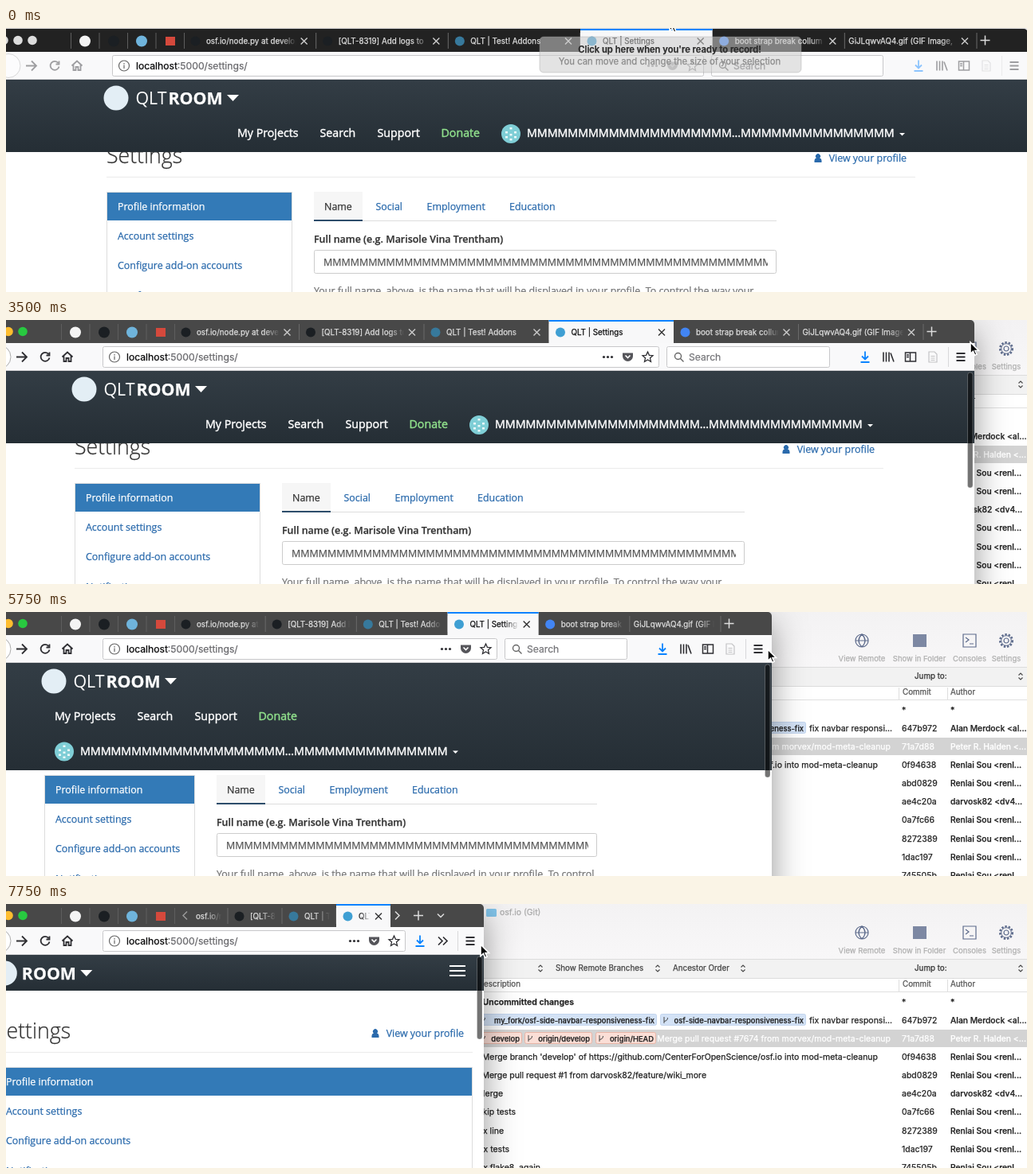
An HTML page with a canvas for the animation above (8000 ms loop, 1280 px wide and 332 px high).

```html
<!DOCTYPE html>
<html lang="en">
<head>
<meta charset="utf-8">
<title>Resizing a settings page</title>
<style>
  html, body { margin: 0; width: 100%; height: 100%; overflow: hidden; background: #fff; }
  canvas { display: block; }
</style>
</head>
<body>
<canvas id="stage" width="1280" height="332"></canvas>
<script>
const ctx = document.getElementById('stage').getContext('2d');
const LOOP = 8000, STEP = 250;
const ZOOM = 0.8895, PAGE_LEFT = -27, PAD = 15 * ZOOM;

// Keyframes as [time, value]
const EDGE = [[2500, 1269], [3500, 1214], [3750, 1200], [4750, 1109], [5000, 1078],
  [5750, 960], [6500, 791], [7500, 642], [7750, 599]];
const DRAG = [[1250, 1], [1500, 0.75], [1750, 0.3], [2000, 0]];
const CURSOR_X = [[0, -449], [500, -340], [1000, -18], [2250, -18], [2500, -5],
  [5750, -5], [6500, -11], [7000, -4]];
const CURSOR_Y = [[0, -11], [500, 122], [1000, 17], [2250, 16], [3500, 28], [4750, 41],
  [5750, 47], [6500, 53], [7750, 51]];

function at(keys, t) {
  if (t <= keys[0][0]) return keys[0][1];
  for (let i = 1; i < keys.length; i++) {
    const [t0, a] = keys[i - 1], [t1, b] = keys[i];
    if (t <= t1) return a + (b - a) * (t - t0) / (t1 - t0);
  }
  return keys[keys.length - 1][1];
}

const ui = (size, weight = 400) => `${weight} ${size}px Inter, sans-serif`;
const sans = (size, weight = 400) => `${weight} ${size}px "Open Sans", sans-serif`;
const BODY = sans(14 * ZOOM), NAV = sans(16 * ZOOM);
const TAB = ui(9.8), ROW = ui(10.5), ADDRESS = ui(12.15);
const LINK = '#2a6aac';

// A hairline stroke gives the slightly heavy look of smoothed screen type.
function text(s, x, y, font, color, align = 'left', heft = 0.25) {
  ctx.font = font;
  ctx.fillStyle = ctx.strokeStyle = color;
  ctx.lineWidth = heft;
  ctx.lineJoin = 'round';
  ctx.textAlign = align;
  ctx.fillText(s, x, y);
  ctx.strokeText(s, x, y);
}
function rect(x, y, w, h, color) {
  ctx.fillStyle = color;
  ctx.fillRect(x, y, w, h);
}
function box(x, y, w, h, r, fill, border) {
  ctx.beginPath();
  ctx.roundRect(x, y, w, h, r);
  if (fill) { ctx.fillStyle = fill; ctx.fill(); }
  if (border) { ctx.strokeStyle = border; ctx.lineWidth = 1; ctx.stroke(); }
}
function disc(x, y, r, color) {
  ctx.beginPath();
  ctx.arc(x, y, r, 0, 7);
  ctx.fillStyle = color;
  ctx.fill();
}
function icon(d, x, y, stroke, width = 1.5, fill) {
  const path = new Path2D(d);
  ctx.save();
  ctx.translate(x, y);
  ctx.lineJoin = 'miter';
  if (fill) { ctx.fillStyle = fill; ctx.fill(path); }
  if (stroke) { ctx.strokeStyle = stroke; ctx.lineWidth = width; ctx.stroke(path); }
  ctx.restore();
}
function clipped(x, y, w, h, draw) {
  ctx.save();
  ctx.beginPath();
  ctx.rect(x, y, w, h);
  ctx.clip();
  draw();
  ctx.restore();
}
function wrap(s, width, font) {
  ctx.font = font;
  const lines = [''];
  for (const word of s.split(' ')) {
    const last = lines[lines.length - 1], joined = last ? last + ' ' + word : word;
    if (last && ctx.measureText(joined).width > width) lines.push(word);
    else lines[lines.length - 1] = joined;
  }
  return lines;
}

const ICON = {
  forward: 'M-7 0H6M0 -6L6 0L0 6',
  reload: 'M4.5 -3.5A5.5 5.5 0 1 0 5.5 1M5.5 -6V-2H1.5',
  home: 'M-6.5 0L0 -6L6.5 0M-4.5 -1V5.5H-1.5V1.5H1.5V5.5H4.5V-1',
  close: 'M-4 -4L4 4M4 -4L-4 4',
  plus: 'M-6 0H6M0 -6V6',
  shield: 'M-6.5 -5H6.5V-1A6.5 6.5 0 0 1 -6.5 -1Z',
  star: 'M0 -6.5L1.9 -2.2L6.5 -1.8L3 1.3L4 6L0 3.5L-4 6L-3 1.3L-6.5 -1.8L-1.9 -2.2Z',
  lens: 'M3.5 -1A4 4 0 1 1 -4.5 -1A4 4 0 1 1 3.5 -1M2.5 2L6.5 6',
  download: 'M0 -7V3M-4 -1L0 3L4 -1M-5.5 6.5H5.5',
  library: 'M-6 -6V6M-2.5 -6V6M1 -6V6M3 -5L7 6',
  sidebar: 'M-6.5 -5.5H6.5V5.5H-6.5ZM-0.5 -5.5V5.5M-5 -2.5H-2M-5 0H-2',
  page: 'M-5 -6.5H2L5 -3.5V6.5H-5ZM-2.5 -1H2.5M-2.5 1.5H2.5M-2.5 4H2.5',
  menu: 'M-5.5 -4.5H5.5M-5.5 0H5.5M-5.5 4.5H5.5',
  more: 'M-5 -5L0 0L-5 5M1 -5L6 0L1 5',
  left: 'M3 -5L-2 0L3 5', right: 'M-2 -5L3 0L-2 5', down: 'M-4 -2L0 2L4 -2',
  updown: 'M-2.5 -1.5L0 -4L2.5 -1.5M-2.5 1.5L0 4L2.5 1.5',
  globe: 'M8 0A8 8 0 1 1 -8 0A8 8 0 1 1 8 0M-8 0H8M0 -8Q-8 0 0 8M0 -8Q8 0 0 8',
  shell: 'M-8 -8H8V8H-8ZM-5 -4L-1 -1L-5 2M0 4H5',
  gear: 'M3 0A3 3 0 1 1 -3 0A3 3 0 1 1 3 0',
  branch: 'M-2 -4V4M2.5 -3Q2.5 1 -2 1.5',
  person: 'M-4.5 5Q-5 0 -2 -0.5A3 3 0 1 1 2 -0.5Q5 0 4.5 5Z',
  arrow: 'M0 0V14.5L3.4 11.4L5.6 16.4L8 15.3L5.9 10.5H10.5Z',
};

// Repository window behind the browser
const RENLAI = 'Renlai Sou <renl...';
const COMMITS = [
  ['Uncommitted changes', 712, '*', '*'],
  ['fix navbar responsi...', 1111, '647b972', 'Alan Merdock <al...'],
  ['Merge pull request #7674 from morvex/mod-meta-cleanup', 1109, '71a7d88', 'Peter R. Halden <...'],
  ["Merge branch 'develop' of https://github.com/CenterForOpenScience/osf.io into mod-meta-cleanup", 1093, '0f94638', RENLAI],
  ['Merge pull request #1 from darvosk82/feature/wiki_more', 878, 'abd0829', RENLAI],
  ['Merge', 623, 'ae4c20a', 'darvosk82 <dv4...'],
  ['Skip tests', 639, '0a7fc66', RENLAI],
  ['fix line', 624, '8272389', RENLAI],
  ['fix tests', 631, '1dac197', RENLAI],
  ['fix flake8, again', 670, '745505b', RENLAI],
];
const TAGS = [
  ['my_fork/osf-side-navbar-responsiveness-fix', 591, 816, 146, '#d3e2f6', '#c3d5ee'],
  ['osf-side-navbar-responsiveness-fix', 820, 1003, 146, '#d3e2f6', '#c3d5ee'],
  ['develop', 591, 647, 169, '#fbded6', '#e8b5a6'],
  ['origin/develop', 650, 735, 169, '#fbded6', '#e8b5a6'],
  ['origin/HEAD', 739, 815, 169, '#fbded6', '#e8b5a6'],
];

function drawRepository() {
  const bar = ctx.createLinearGradient(0, 0, 0, 70);
  bar.addColorStop(0, '#f3f2f3');
  bar.addColorStop(1, '#f8f7f8');
  rect(0, 0, 1280, 332, '#fff');
  rect(0, 0, 1280, 70, bar);
  box(602, 6, 13, 10, 1.5, '#82c4ea');
  text('osf.io (Git)', 619, 14, ui(10.5), '#aaa');

  const blue = '#5d6b8c';
  icon(ICON.globe, 1073, 36, blue, 1.2);
  rect(1137, 28, 17, 16, '#7d88a3');
  icon(ICON.shell, 1208, 36, blue, 1.2);
  icon(ICON.gear, 1254, 36, blue, 1.2);
  ctx.setLineDash([2.4, 1.9]);
  icon('M7.7 0A7.7 7.7 0 1 1 -7.7 0A7.7 7.7 0 1 1 7.7 0', 1254, 36, blue, 2.6);
  ctx.setLineDash([]);
  icon('M6.3 0A6.3 6.3 0 1 1 -6.3 0A6.3 6.3 0 1 1 6.3 0', 1254, 36, blue, 1);
  [['View Remote', 1073], ['Show in Folder', 1145], ['Consoles', 1208], ['Settings', 1254]]
    .forEach(([s, x]) => text(s, x, 62, ui(9.5), '#b0b0b0', 'center'));

  rect(0, 69, 1280, 1, '#dcdcdc');
  rect(0, 70, 1280, 23, '#f2f2f2');
  rect(0, 93, 1280, 1, '#dcdcdc');
  text('Show Remote Branches', 689, 84, TAB, '#444');
  text('Ancestor Order', 836, 84, TAB, '#444');
  text('Jump to:', 1139, 84, TAB, '#333');
  for (const x of [670, 817, 924, 1272]) icon(ICON.updown, x, 81, '#444', 1.1);

  text('Description', 645, 104, TAB, '#555', 'right');
  text('Commit', 1124, 104, TAB, '#555');
  text('Author', 1184, 104, TAB, '#555');
  rect(1119, 95, 1, 15, '#ddd');
  rect(1180, 95, 1, 15, '#ddd');
  rect(0, 110, 1280, 1, '#e0e0e0');

  rect(0, 158, 1280, 22, '#d3d3d3');
  COMMITS.forEach(([message, right, hash, author], i) => {
    const y = 126.5 + i * 23.15, color = i === 2 ? '#fff' : '#222';
    text(message, right, y, i ? ROW : ui(10.5, 600), color, 'right');
    text(hash, 1123, y, ROW, color);
    text(author, 1184, y, ui(10.3, 500), color);
  });
  for (const [name, left, right, y, fill, border] of TAGS) {
    box(left + 0.5, y - 7.5, right - left - 1, 14, 2, fill, border);
    icon(ICON.branch, left + 7, y, '#444', 1);
    text(name, right - 3, y + 3.5, ui(9.4, 500), '#222', 'right');
  }
}

// Browser chrome
const TABS = [
  ['osf.io/node.py at develop', '#1b1f23'],
  ['[QLT-8319] Add logs to', '#1b1f23'],
  ['QLT | Test! Addons', '#37799c'],
  ['QLT | Settings', '#3f9fd3'],
  ['boot strap break collum', '#4285f4'],
  ['GiJLqwvAQ4.gif (GIF Image,', null],
];
const TABS_LEFT = 211, MIN_TAB = 68, ACTIVE = 3;

function drawTab(i, x, w) {
  const [title, color] = TABS[i], active = i === ACTIVE;
  const closable = active || w > 120;
  if (active) {
    rect(x, 0, w, 29, '#f8f8f9');
    rect(x, 0, w, 2, '#0a84ff');
  } else {
    rect(x + w - 0.5, 5, 1, 20, '#6a6a6a');
  }
  if (color) disc(x + 14.5, 15.5, 6, color);
  const start = x + (color ? 28 : 5), end = x + w - (closable ? 25 : 8);
  if (end > start) {
    const rgb = active ? '12,12,13' : '222,222,222';
    const fade = ctx.createLinearGradient(Math.max(start, end - 20), 0, end, 0);
    fade.addColorStop(0, `rgba(${rgb},1)`);
    fade.addColorStop(1, `rgba(${rgb},0)`);
    text(title, start, 19, TAB, fade);
  }
  if (closable) icon(ICON.close, x + w - 15, 15.5, active ? '#333' : '#ccc', 1.4);
}

function drawTabStrip(edge, active) {
  rect(-40, 0, edge + 40, 29, active ? '#484848' : '#222');
  const lights = active ? ['#ff5f57', '#ffbd2e', '#28c940'] : ['#ddd', '#ddd', '#ddd'];
  lights.forEach((color, i) => disc(-15 + 18 * i, 14.5, 5.8, color));
  for (let i = 0; i < 5; i++) rect(69 + 35.5 * i, 5, 1, 20, '#5e5e5e');
  disc(87, 15.5, 7, '#f4f4f4');
  disc(123, 15.5, 7, '#1b1f23');
  disc(158, 15.5, 7, '#6fb4dc');
  rect(188, 10, 12, 11, '#d5493c');

  const fit = (edge - 275) / TABS.length;
  if (fit >= MIN_TAB) {
    TABS.forEach((_, i) => drawTab(i, TABS_LEFT + fit * i, fit));
    icon(ICON.plus, edge - 53.5, 14.5, '#ddd');
    return;
  }
  const left = 236, right = edge - 117;
  const scroll = Math.max(0, left + MIN_TAB * (ACTIVE + 1) - right);
  clipped(left - 2, 0, right - left + 2, 29, () =>
    TABS.forEach((_, i) => drawTab(i, left + MIN_TAB * i - scroll, MIN_TAB)));
  icon(ICON.left, 224, 14.5, '#999');
  icon(ICON.right, edge - 109, 14.5, '#ddd');
  icon(ICON.plus, edge - 82, 14.5, '#ddd');
  icon(ICON.down, edge - 54, 14.5, '#ddd');
}

function drawToolbar(edge, active) {
  const compact = edge < 720, y = 46.5, room = edge - 302;
  const urlRight = Math.round(compact ? edge - 99 : 121 + 0.8 * room - 32.6);
  rect(-40, 29, edge + 40, 35, '#f9f9fa');
  rect(-40, 63, edge + 40, 1, '#d4d4d6');
  box(121.5, 33.5, urlRight - 121, 26, 2, '#fff', '#c8c8ca');
  if (!compact) box(urlRight + 10.5, 33.5, Math.round(edge) - 192 - urlRight, 26, 2, '#fff', '#c8c8ca');

  const ink = '#2f2f33';
  ctx.save();
  if (!active) ctx.globalAlpha = 0.45;
  disc(-9, y, 15, '#fff');
  icon('M15 0A15 15 0 1 1 -15 0A15 15 0 1 1 15 0', -9, y, '#aaa', 1);
  icon(ICON.forward, 20, y, ink, 1.8);
  icon(ICON.reload, 49, y, ink, 1.8);
  icon(ICON.home, 77, y, ink, 1.8);
  for (const dx of [-5, 0, 5]) disc(urlRight - 63.5 + dx, y, 1.6, ink);
  icon(ICON.shield, urlRight - 38.5, y, null, 0, '#55555a');
  icon('M-3 -2L0 1L3 -2', urlRight - 38.5, y, '#fff', 1.6);
  icon(ICON.star, urlRight - 13.5, y, ink, 1.3);
  icon(ICON.download, edge - (compact ? 80 : 137), y, '#0a84ff', 1.8);
  if (compact) {
    icon(ICON.more, edge - 52, y, ink, 1.7);
  } else {
    icon(ICON.library, edge - 108, y, ink, 1.6);
    icon(ICON.sidebar, edge - 80, y, ink, 1.5);
    icon(ICON.page, edge - 52, y, '#c4c4c6', 1.2);
  }
  rect(edge - 33, 34, 1, 25, '#d8d8da');
  icon(ICON.menu, edge - 17, y, ink, 1.8);
  ctx.restore();

  icon('M6.5 0A6.5 6.5 0 1 1 -6.5 0A6.5 6.5 0 1 1 6.5 0M0 -1V3.5M0 -3.5V-2', 136, y, '#666', 1.2);
  text('localhost', 151, 51, ADDRESS, '#0c0c0d');
  const host = ctx.measureText('localhost').width;
  text(':5000/settings/', 151 + host, 51, ADDRESS, '#6a6a6e');
  if (!compact) {
    icon(ICON.lens, urlRight + 25, y, '#666', 1.4);
    text('Search', urlRight + 38, 51, ADDRESS, '#77777b');
  }
}

// Web page with its responsive grid
function gridFor(edge) {
  const px = (edge - PAGE_LEFT) / ZOOM;
  const size = px >= 1200 ? 'lg' : px >= 992 ? 'md' : px >= 768 ? 'sm' : 'xs';
  const container = { lg: 1170, md: 970, sm: 750, xs: px }[size] * ZOOM;
  const left = Math.round((edge + PAGE_LEFT - container) / 2 + PAD);
  const right = Math.round(left + container - 2 * PAD);
  return { size, left, right, col: container / 12 };
}

function drawSidebar(x, w) {
  rect(x, 205, w, 130, '#ddd');
  rect(x + 1, 206, w - 2, 130, '#fff');
  rect(x + 1, 206, w - 2, 35, '#337ab7');
  let y = 227.5;
  ['Profile information', 'Account settings', 'Configure add-on accounts', 'Notifications'].forEach((item, i) => {
    const lines = wrap(item, w - 26, BODY);
    lines.forEach((line, n) => text(line, x + 14, y + 18 * n, BODY, i ? LINK : '#fff'));
    y += 37.4 + 18 * (lines.length - 1);
  });
}

function drawForm(x, w) {
  rect(x, 241, w, 1, '#ddd');
  rect(x, 205, 61, 36, '#f6f6f6');
  rect(x, 240, 61, 2, '#2d4d6b');
  text('Name', x + 13, 227.5, BODY, '#333');
  [['Social', 77.5], ['Employment', 141.5], ['Education', 245]]
    .forEach(([s, dx]) => text(s, x + dx, 227.5, BODY, LINK));
  text('Full name (e.g. Marisole Vina Trentham)', x, 268.5, sans(14 * ZOOM, 600), '#333');
  box(x + 0.5, 278.5, w - 1, 29, 2, '#fff', '#ccc');
  clipped(x + 11, 280, w - 22, 26, () => text('M'.repeat(70), x + 12, 297.5, BODY, '#555'));
  const hint = 'Your full name, above, is the name that will be displayed in your profile. To control the way your name';
  text(wrap(hint, w, BODY)[0], x, 334, BODY, '#777');
}

function drawAvatar(x, y) {
  disc(x, y, 12, '#7fced6');
  for (const [dx, dy] of [[-7, -3], [4, -3], [-7, 3], [4, 3], [-1.5, -8], [-1.5, 6], [-1.5, 0]])
    rect(x + dx, y + dy, 3, 2.5, '#eefafa');
}

function caret(x, y, w, h) {
  icon(`M0 0H${w}L${w / 2} ${h}Z`, x, y, null, 0, '#fff');
}

function drawNavbar(edge, grid) {
  const { size, left } = grid, collapsed = size === 'sm' || size === 'xs';
  const bottom = { lg: 155, md: 199 }[size] || 109;
  const shade = ctx.createLinearGradient(0, 64, 0, bottom);
  shade.addColorStop(0, '#333d45');
  shade.addColorStop(1, '#252e35');
  rect(-40, 64, edge + 40, bottom - 64, shade);

  const brand = collapsed ? PAGE_LEFT + PAD : left, full = size !== 'xs';
  disc(brand + 12, 87, 15.5, '#e3eef5');
  if (full) text('QLT', brand + 36.5, 95, sans(24 * ZOOM), '#fff', 'left', 0.01);
  text('ROOM', brand + (full ? 77.5 : 33.5), 95, sans(24 * ZOOM, 700), '#fff');
  caret(brand + (full ? 151 : 107), 83, 15, 8);

  if (collapsed) {
    const x = edge - (full ? 56 : 43);
    for (const y of [77, 83, 89]) rect(x, y, 20, 2, '#fff');
    return;
  }
  const x = left + (size === 'lg' ? 164 : 13);
  [['My Projects', 0], ['Search', 103.5], ['Support', 175.5], ['Donate', 255.5]]
    .forEach(([s, dx]) => text(s, x + dx, 136, NAV, s === 'Donate' ? '#90e08c' : '#fff', 'left', 0.45));
  const [ax, ay] = size === 'lg' ? [left + 507, 132] : [left + 25, 175.5];
  drawAvatar(ax, ay);
  text('M'.repeat(20) + '...' + 'M'.repeat(15), ax + 20, ay + 4, NAV, '#fff', 'left', 0.45);
  caret(ax + 487, ay - 1, 7, 3.5);
}

function drawPage(edge) {
  const grid = gridFor(edge), { size, left, right, col } = grid;
  rect(-40, 64, edge + 40, 270, '#fff');
  text('Settings', left, 169, sans(30 * ZOOM, 300), '#333');
  text('View your profile', right - 11, 166.5, BODY, LINK, 'right');
  icon(ICON.person, right - 122, 163, null, 0, LINK);
  rect(left, 186, right - left, 1, '#ebebeb');
  if (size === 'xs') {
    drawSidebar(left, right - left);
  } else {
    drawSidebar(left, Math.round(3 * col - 2 * PAD));
    drawForm(Math.round(left + 3 * col), Math.round((size === 'sm' ? 9 : 7) * col - 2 * PAD));
  }
  drawNavbar(edge, grid);
  if (edge < 1269) {
    const end = size === 'xs' ? 170 : size === 'lg' ? 211 : 208;
    box(edge - 8.5, 66, 6.5, end - 66, 3.2, 'rgba(0,0,0,.55)', 'rgba(255,255,255,.25)');
  }
}

function drawBrowser(edge, active) {
  ctx.save();
  ctx.shadowColor = 'rgba(0,0,0,.42)';
  ctx.shadowBlur = 42;
  ctx.shadowOffsetY = 14;
  box(-40, 0, edge + 40, 500, 5, '#fff');
  ctx.restore();
  ctx.save();
  ctx.beginPath();
  ctx.roundRect(-40, 0, edge + 40, 500, 5);
  ctx.clip();
  drawPage(edge);
  drawTabStrip(edge, active);
  drawToolbar(edge, active);
  ctx.restore();
}

function drawNotice() {
  box(669, 11, 328, 45, 5, 'rgba(205,205,205,.55)', 'rgba(150,150,150,.35)');
  text("Click up here when you're ready to record!", 832, 30.5, ui(11.2, 600), '#2a2a2a', 'center');
  text('You can move and change the size of your selection', 832, 45.5, ui(11.3), '#8b8b8b', 'center');
}

function draw(now) {
  const t = Math.floor(now % LOOP / STEP) * STEP;
  const edge = at(EDGE, t), drag = at(DRAG, t);
  drawRepository();
  ctx.save();
  ctx.translate(Math.round(12 * drag), Math.round(drag));
  drawBrowser(edge, t >= 1000);
  ctx.restore();
  if (t < STEP) drawNotice();
  icon(ICON.arrow, edge + 12 * drag + at(CURSOR_X, t), at(CURSOR_Y, t), '#fff', 1.6, '#000');
}

const start = performance.now();
function tick() {
  draw(performance.now() - start);
  requestAnimationFrame(tick);
}
tick();
</script>
</body>
</html>
```
